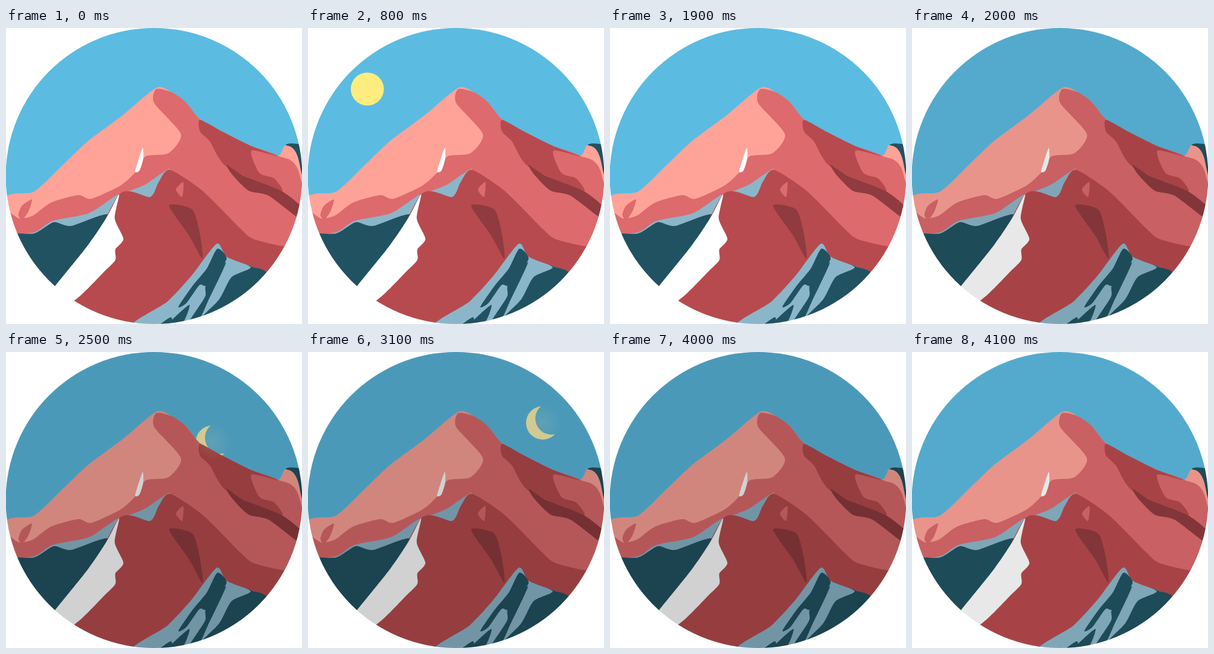
An HTML page with a canvas that plays this animation: 479x480 px, repeating every 4.2 s.

```html
<!DOCTYPE html>
<html lang="en">
<head>
<meta charset="utf-8">
<title>Mountain, day and night</title>
<style>
html, body { margin: 0; width: 100%; height: 100%; overflow: hidden; background: #fff; }
canvas { display: block; }
</style>
</head>
<body>
<canvas id="stage" width="479" height="480"></canvas>
<script>
const ctx = document.getElementById('stage').getContext('2d');
const W = 479, H = 480, LOOP = 4200, STEP = 100;
const SKY = '#5bbbe1', PINK = '#ffa398', ROSE = '#dd6a6d', RED = '#b74a4e', BROWN = '#8f3b3f';
const ICE = '#8bb6c9', TEAL = '#215261', SNOW = '#fff', SUN = '#ffec7e', MOON = '#fff6b2';

// Smooth closed outline through a few key points
function outline(text) {
  const pts = text.trim().split(/\s+/).map(pair => pair.split(',').map(Number));
  const at = i => pts[(i + pts.length) % pts.length];
  const bend = (p, from, to, amount) => p.map((v, i) => v + (to[i] - from[i]) * amount);
  const path = new Path2D();
  path.moveTo(...pts[0]);
  pts.forEach((p, i) => {
    const next = at(i + 1);
    path.bezierCurveTo(...bend(p, at(i - 1), next, 0.12), ...bend(next, p, at(i + 2), -0.12), ...next);
  });
  return path;
}

const eastRidge = '268,104 290,119 314,148 350,168 396,191 440,207';
const base = '500,490 -9,490';

// Painted back to front, so each layer only has to define its visible edge
const layers = [
  [TEAL, '453,189 500,202 500,300 450,240'],
  [PINK, `-9,286 46,265 96,218 133,183 188,142 243,97 ${eastRidge} 453,190 476,225 ${base}`],
  [ROSE, `-9,305 22,309 44,304 73,283 117,271 138,277 186,255 212,231 226,208 263,203
    283,172 240,122 243,99 ${eastRidge} 476,241 ${base}`],
  [ROSE, '42,278 26,288 20,303 26,311 36,298'],
  [SNOW, '221,195 222,212 216,231 209,232'],
  [RED, '314,149 350,168 396,191 440,208 397,199 410,235 434,244 445,265 357,225 330,184 314,168'],
  [BROWN, '357,222 385,240 445,264 478,290 478,311 425,272 393,264 368,240'],
  [ICE, '-9,339 46,331 75,313 135,300 183,270 176,310 -9,360'],
  [TEAL, '-9,341 46,333 77,315 105,321 170,303 165,380 90,440 -9,440'],
  [ICE, '188,271 225,254 265,228 246,262 233,280'],
  [RED, '183,270 233,274 247,250 265,230 318,264 378,324 400,342 450,354 500,354 500,490 80,490 120,400'],
  [SNOW, '183,270 163,307 132,353 79,419 40,470 109,443 160,394 177,376 177,359 190,342 176,309'],
  [BROWN, '264,288 301,294 313,330 318,374 296,336'],
  [ROSE, '275,262 287,250 285,274'],
  [ICE, '205,492 262,443 300,402 341,350 357,371 398,387 425,402 500,490'],
  [TEAL, '342,358 357,374 338,402 323,418 313,417 292,446 279,452 302,418 325,390'],
  [TEAL, '356,380 326,445 314,470 296,477 322,436 324,416'],
  [TEAL, '358,372 398,387 425,402 425,490 305,490 345,440 365,404 396,388'],
  [TEAL, '297,449 286,478 260,484 274,468'],
  [TEAL, '267,469 267,484 246,484']
].map(([color, points]) => [color, outline(points)]);

function disc(x, y, r, color) {
  ctx.fillStyle = color;
  ctx.beginPath();
  ctx.arc(x, y, r, 0, Math.PI * 2);
  ctx.fill();
}

// The crescent is the outer circle minus an offset inner one
function crescent(x, y) {
  const dx = 14, dy = -7, outer = 27, inner = 26;
  const gap = Math.hypot(dx, dy), axis = Math.atan2(dy, dx);
  const a = Math.acos((gap ** 2 + outer ** 2 - inner ** 2) / (2 * gap * outer));
  const b = Math.acos((outer ** 2 - gap ** 2 - inner ** 2) / (2 * gap * inner));
  ctx.fillStyle = MOON;
  ctx.beginPath();
  ctx.arc(x, y, outer, axis + a, axis - a);
  ctx.arc(x + dx, y + dy, inner, axis - b, axis + b, true);
  ctx.fill();
}

function halo(x, y) {
  const glow = ctx.createRadialGradient(x, y, 4, x, y, 30);
  glow.addColorStop(0, 'rgba(255,245,190,0.14)');
  glow.addColorStop(1, 'rgba(255,245,190,0)');
  disc(x, y, 30, glow);
}

// Position of a body moving steadily through (x, y) at time t0
const drift = (t, t0, x, y, vx, vy) => [x + (t - t0) * vx, y + (t - t0) * vy];

function drawScene(t) {
  const dusk = t < 2000 ? 0 : t < 2100 || t >= 4100 ? 1 : 2;
  const moonUp = t >= 2200 && t < 4100;
  const sun = drift(t, 800, 96, 99, 0.0964, 0.071);
  const moon = drift(t, 2500, 334, 146, 0.0764, -0.0518);

  ctx.globalCompositeOperation = 'source-over';
  ctx.fillStyle = SKY;
  ctx.fillRect(0, 0, W, H);
  if (t >= 200 && t < 2000) disc(...sun, 26.8, SUN);
  if (moonUp) crescent(...moon);
  for (const [color, path] of layers) {
    ctx.fillStyle = color;
    ctx.fill(path);
  }
  if (moonUp) halo(...moon);

  ctx.fillStyle = `rgba(0,0,0,${dusk * 0.09})`;
  ctx.fillRect(0, 0, W, H);

  // Keep only the round window
  ctx.globalCompositeOperation = 'destination-in';
  disc(W / 2, H / 2, H / 2, '#000');
}

const start = performance.now();
function tick() {
  const t = (performance.now() - start) % LOOP;
  drawScene(Math.floor(t / STEP) * STEP);
  requestAnimationFrame(tick);
}
tick();
</script>
</body>
</html>
```
